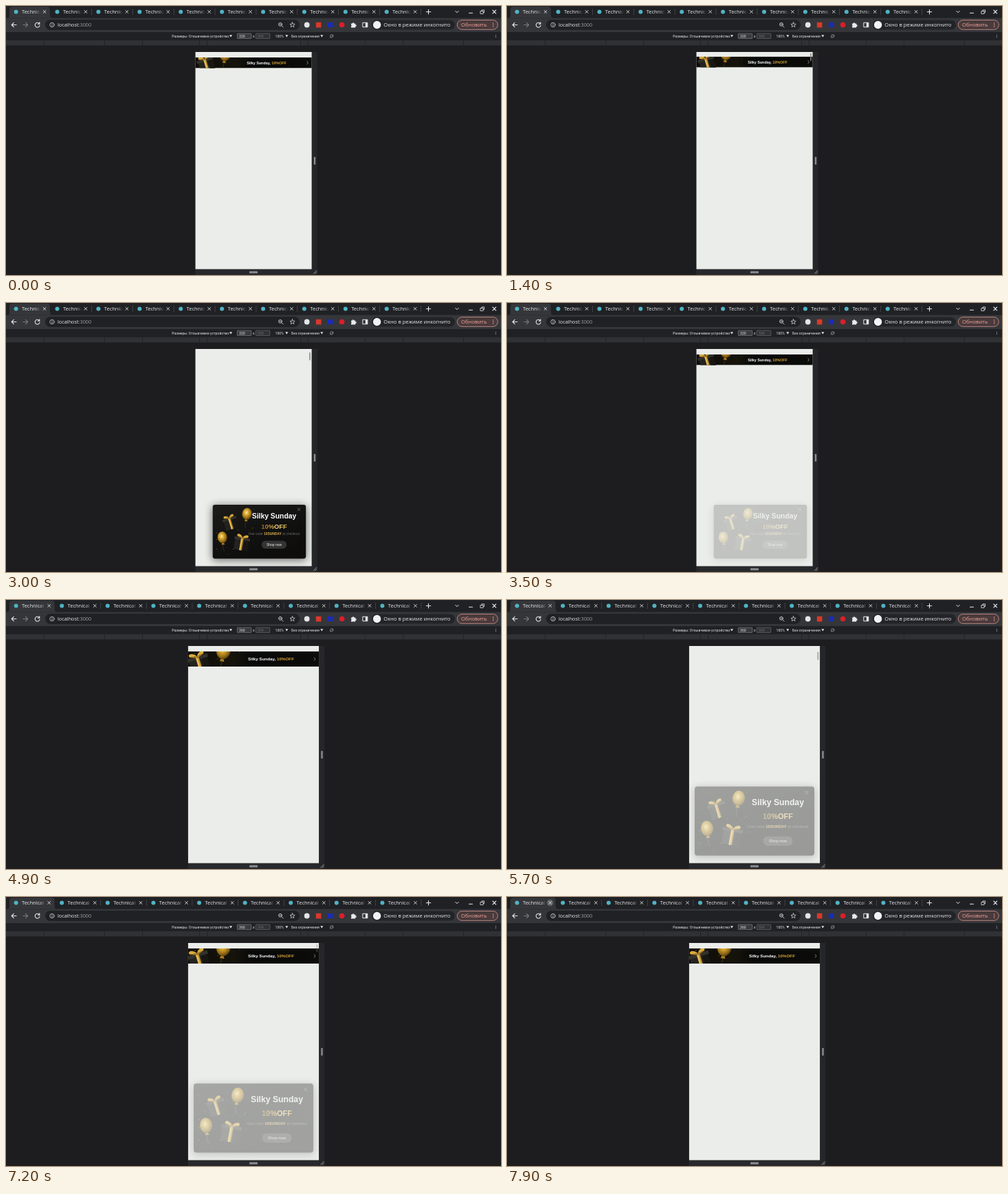
Recreate the animation shown at these times as an HTML page. Size 720 px wide and 392 px high, loop 8 s.

```html
<!DOCTYPE html>
<html lang="ru">
<head>
<meta charset="utf-8">
<title>Banner demo</title>
<style>
html, body { margin: 0; width: 100%; height: 100%; overflow: hidden; background: #1d1d1f; }
svg { display: block; width: 100vw; height: 100vh; }
text { white-space: pre; }
.ui { font-family: "Open Sans", "Noto Sans", sans-serif; fill: #e8eaed; }
.tool { font: 5.15px Roboto, sans-serif; fill: #e3e5e8; }
.shop { font-family: "Liberation Sans", Arial, sans-serif; text-anchor: middle; }
.b { font-weight: 700; }
.line { fill: none; stroke: #e8eaed; stroke-linecap: round; stroke-linejoin: round; }

.narrow, .wide, .scroll, .thumb, .card, .hover { animation: 8s linear infinite; }
.narrow { animation-name: narrow; }
.wide { animation-name: wide; }
.narrow .scroll { animation-name: scroll-a; }
.wide .scroll { animation-name: scroll-b; }
.narrow .thumb { animation-name: thumb-a; }
.wide .thumb { animation-name: thumb-b; }
.narrow .card { animation-name: card-a; }
.wide .card { animation-name: card-b; }
.hover { animation-name: hover; }

@keyframes narrow { 0%, 57.49% { visibility: visible; } 57.5%, 100% { visibility: hidden; } }
@keyframes wide { 0%, 57.49% { visibility: hidden; } 57.5%, 100% { visibility: visible; } }
@keyframes scroll-a {
  0%, 17.3% { transform: translateY(0); }
  17.5% { transform: translateY(-1px); }
  21.5% { transform: translateY(-26px); }
  25%, 34.5% { transform: translateY(-185px); }
  38.75% { transform: translateY(-20px); }
  40%, 100% { transform: translateY(0); }
}
@keyframes scroll-b {
  0%, 67.5% { transform: translateY(0); }
  69% { transform: translateY(-30px); }
  71.2%, 82% { transform: translateY(-185px); }
  85% { transform: translateY(-22px); }
  87%, 100% { transform: translateY(0); }
}
@keyframes thumb-a {
  0%, 17.2% { transform: translateY(0); opacity: 0; }
  17.5%, 20% { transform: translateY(0); opacity: .85; }
  25% { transform: translateY(7px); opacity: .85; }
  27.5%, 33.5% { transform: translateY(7px); opacity: .3; }
  34.5% { transform: translateY(7px); opacity: .85; }
  40% { transform: translateY(0); opacity: .85; }
  44%, 100% { transform: translateY(0); opacity: 0; }
}
@keyframes thumb-b {
  0%, 67.3% { transform: translateY(0); opacity: 0; }
  67.5% { transform: translateY(0); opacity: .7; }
  71.2% { transform: translateY(7px); opacity: .7; }
  76%, 81% { transform: translateY(7px); opacity: .3; }
  82% { transform: translateY(7px); opacity: .7; }
  85%, 88% { transform: translateY(0); opacity: .7; }
  93%, 100% { transform: translateY(0); opacity: 0; }
}
@keyframes card-a {
  0%, 21.6% { opacity: 0; }
  28.1%, 38.75% { opacity: 1; }
  44.9%, 100% { opacity: 0; }
}
@keyframes card-b {
  0%, 69% { opacity: 0; }
  75.25%, 86% { opacity: 1; }
  92%, 100% { opacity: 0; }
}
@keyframes hover { 0%, 96.8% { opacity: 0; } 96.9%, 100% { opacity: 1; } }
</style>
</head>
<body>
<svg id="stage" viewBox="0 0 720 392" preserveAspectRatio="none">
  <defs>
    <linearGradient id="gold">
      <stop offset="0" stop-color="#94641f"/><stop offset=".35" stop-color="#c7953e"/>
      <stop offset=".6" stop-color="#f5d67c"/><stop offset="1" stop-color="#d9ae4f"/>
    </linearGradient>
    <radialGradient id="balloon" cx=".42" cy=".4" r=".65">
      <stop offset="0" stop-color="#ffe9a0"/><stop offset=".35" stop-color="#d7a62e"/>
      <stop offset=".75" stop-color="#8f6715"/><stop offset="1" stop-color="#4a350c"/>
    </radialGradient>
    <linearGradient id="strip">
      <stop offset="0" stop-color="#0d0b06"/><stop offset=".35" stop-color="#15130a"/>
      <stop offset=".5" stop-color="#070808"/><stop offset="1" stop-color="#0c0c09"/>
    </linearGradient>
    <linearGradient id="dark" x2=".6" y2="1">
      <stop offset="0" stop-color="#1d1c1a"/><stop offset=".5" stop-color="#121212"/><stop offset="1" stop-color="#0e0d0c"/>
    </linearGradient>
    <filter id="blur" x="-30%" y="-40%" width="160%" height="180%"><feGaussianBlur stdDeviation="6"/></filter>
  </defs>
</svg>
<script>
const TITLE = 'Silky Sunday', CODE = '10SUNDAY';
const stage = document.getElementById('stage');

const rect = (x, y, w, h, fill, r = 0, more = '') =>
  `<rect x="${x}" y="${y}" width="${w}" height="${h}" rx="${r}" fill="${fill}" ${more}/>`;
const disc = (x, y, r, fill) => `<circle cx="${x}" cy="${y}" r="${r}" fill="${fill}"/>`;
const line = (d, w = 1, more = '') => `<path class="line" d="${d}" stroke-width="${w}" ${more}/>`;
const text = (cls, x, y, s, more = '') => `<text class="${cls}" x="${x}" y="${y}" ${more}>${s}</text>`;
const cross = (x, y, r, w, more = '') =>
  line(`M${x - r} ${y - r}L${x + r} ${y + r}M${x + r} ${y - r}L${x - r} ${y + r}`, w, more);
const down = (x, y) => `<path d="M${x} ${y}h4l-2 3.2z" fill="#e3e5e8"/>`;
const dots = (x, y, gap, r, fill) => [-gap, 0, gap].map(d => disc(x, y + d, r, fill)).join('');

function random(seed) {
  return () => (seed = (seed * 16807) % 2147483647) / 2147483647;
}

function confetti() {
  const rnd = random(77);
  let out = '';
  for (let i = 0; i < 34; i++) {
    const x = 5 + rnd() * 72, y = 5 + rnd() * 90, s = .5 + rnd() * 1.3;
    out += rect(x.toFixed(1), y.toFixed(1), s.toFixed(1), (s * .8).toFixed(1),
      rnd() < .5 ? '#b98c2c' : '#6d5220', .3);
  }
  return out;
}

const balloon = (x, y, tilt) => `<g transform="translate(${x} ${y}) rotate(${tilt})">
  <path d="M-1.5 10L1.5 10L3 14H-3Z" fill="#a67a1f"/>
  <path d="M0 14Q-2 20 1 27" fill="none" stroke="#6d5220" stroke-width=".5"/>
  <ellipse rx="9" ry="11" fill="url(#balloon)"/></g>`;

const gift = (x, y, size, tilt) => `<g transform="translate(${x} ${y}) rotate(${tilt}) scale(${size})">
  <path d="M-12 -6H12V13H-12Z" fill="#24231f"/><path d="M4 -6H12V13H4Z" fill="#171613"/>
  <path d="M-13.5 -9H13.5V-4.5H-13.5Z" fill="#33312b"/>
  <path d="M-2 -9H2V13H-2Z" fill="#c4942f"/><path d="M-2 -9H0V13H-2Z" fill="#e6bf5c"/>
  <path d="M0 -9C-4 -16 -12 -15 -9 -10ZM0 -9C4 -16 12 -15 9 -10Z" fill="#d9aa3e"/>
  <path d="M-9 -10L0 -9L9 -10L0 -6.5Z" fill="#a57820"/></g>`;

const art = confetti() + balloon(64, 17, 8) + gift(33, 33, 1, -17) +
  balloon(18, 61, -6) + gift(54, 71, 1.1, 10);

function tabs(n, w) {
  const id = 'fade' + n;
  let out = `<defs><linearGradient id="${id}" gradientUnits="userSpaceOnUse" x1="${w - 18}" y1="0" x2="${w - 9}" y2="0">
    <stop offset="0" stop-color="#e8eaed"/><stop offset="1" stop-color="#e8eaed" stop-opacity="0"/></linearGradient></defs>
    <path d="M1 17.5Q5 17.5 5 13V5Q5 1 9 1H${w}Q${w + 4} 1 ${w + 4} 5V13Q${w + 4} 17.5 ${w + 8} 17.5Z" fill="#35363a"/>`;
  for (let i = 0; i < n; i++) {
    out += `<g transform="translate(${i * w} 0)">` + disc(14.6, 8.4, 3, '#4fb3c4') +
      text('ui', 23, 11, 'Technical', `font-size="7.5" style="fill:url(#${id})"`);
    if (!i && n === 9) out += `<g class="hover">${disc(w - 3.9, 8.4, 4.6, '#5f6368')}</g>`;
    out += cross(w - 3.9, 8.4, 1.9, .9);
    if (i) out += rect(w + 4.2, 4, .6, 9, '#55585d');
    out += '</g>';
  }
  return out;
}

function banner(c) {
  const { x, w, h } = c;
  return `<g class="scroll"><svg x="${x}" y="75" width="${w}" height="${h}">
    ${rect(0, 0, w, h, 'url(#strip)')}
    <g transform="translate(${c.art})">${art}</g>
    ${rect(w * .39, 1, 1, .6, '#8a6a2a')}${rect(w * .64, 1.4, 1, .6, '#6d5220')}${rect(w * .8, h - 3, 1, .6, '#5a461d')}
    </svg>
    <text class="shop b" x="${c.bx}" y="${c.by}" font-size="${c.bs}" fill="#fff">${TITLE}, <tspan fill="#d6a437">10%OFF</tspan></text>
    ${line(`M${x + w - 7} ${75 + h / 2 - 2.2}l1.6 2.2l-1.6 2.2`, .7, 'style="stroke:#aaa"')}</g>`;
}

function card(c) {
  const [x, y, w, h] = c.box, k = w / 174;
  return `<g class="card">
    ${rect(x - 1, y + 1, w + 2, h + 2, '#000', 5, 'opacity=".5" filter="url(#blur)"')}
    ${rect(x, y, w, h, 'url(#dark)', 4 * k)}
    <g transform="translate(${x} ${y}) scale(${k})">${art}</g>
    ${cross(c.cx, y + 8.6 * k, 2.5 * k, .6, 'style="stroke:#999"')}
    ${text('shop b', c.mid, c.y1, TITLE, `font-size="${12.2 * c.f}" fill="#fff"`)}
    ${text('shop b', c.mid, c.y2, '10%OFF', `font-size="${11 * c.f}" fill="url(#gold)"`)}
    <text class="shop" x="${c.mid}" y="${c.y3}" font-size="${5.8 * c.f}" fill="#6a6a6a">Use code <tspan class="b" fill="#dcb052">${CODE}</tspan> at checkout</text>
    ${rect(c.mid - 21.5 * c.f, c.y4, 43 * c.f, 13.3 * c.f, '#343434', 6.6 * c.f)}
    ${text('shop', c.mid, c.y4 + 8.6 * c.f, 'Shop now', `font-size="${5.85 * c.f}" fill="#f2f2f2"`)}
  </g>`;
}

function scene(c) {
  const { x, w } = c, r = x + w, id = 'view' + w;
  return `<g class="${c.name}">${tabs(c.tabs, c.step)}
    ${text('tool', 339, 45.8, c.label)}
    ${rect(x, 384, w + 8, 8, '#28292c')}${rect(r, 67, 8, 325, '#252629')}
    ${rect(354, 386.6, 12, 3, '#8b8d91', .5)}${rect(r + 3, 220, 2.4, 11, '#8b8d91', .5)}
    ${line(`M${r + 2.5} 390l4.5-4.5M${r + 5} 390l2-2`, .8, 'style="stroke:#b5b7ba"')}
    <clipPath id="${id}">${rect(x, 67, w, 316.5, '#000')}</clipPath>
    <g clip-path="url(#${id})">${rect(x, 67, w, 317, '#ebedea')}
      ${banner(c)}${card(c)}
      <g class="thumb">${rect(r - 3.8, 68.7, 1.8, 11.6, '#85878a', .9)}</g>
    </g></g>`;
}

function chrome() {
  let ruler = rect(0, 50, 720, 7.5, '#303134');
  for (const d of [55, 143, 198, 281, 292, 428, 439, 522, 577, 665]) ruler += rect(d, 50, .7, 7.5, '#1f2023');
  return rect(0, 0, 720, 392, '#1d1d1f') + rect(0, 0, 720, 18, '#202124') +
    rect(0, 17.5, 720, 20.5, '#35363a') + rect(0, 38, 720, 12, '#202124') + ruler +
    // window controls
    line('M614.5 5.3v6.4M611.3 8.5h6.4', 1.1) + line('M653.8 7.4l2.2 2.2l2.2-2.2', 1) +
    line('M673.5 10.3h5', 1.1) + line('M690.3 7.5h3.8v3.8h-3.8zM692 7.3v-1.5h3.6v3.6h-1.3', .8) +
    cross(710.3, 8.4, 2.4, 1.1) +
    // navigation
    line('M15 27.5H8.3M11.3 24.4L8.2 27.5L11.3 30.6', 1.1) +
    line('M24.8 27.5H31.5M28.5 24.4L31.6 27.5L28.5 30.6', 1.1, 'opacity=".38"') +
    line('M48.4 25.6A3.4 3.4 0 1 0 49 28.4M48.8 23.8V26.2H46.4', 1.1) +
    // address bar
    rect(57, 20, 370, 15, '#202124', 7.5) +
    `<circle class="line" cx="67" cy="27.5" r="3.2" stroke-width=".7"/>` + line('M67 27.2v1.9M67 25.7v.1', .8) +
    `<text class="ui" x="75" y="30" font-size="7.3">localhost<tspan fill="#9aa0a6">:3000</tspan></text>` +
    `<circle class="line" cx="399" cy="26.8" r="2.4" stroke-width=".8"/>` + line('M401 28.8l2.2 2.2M398 26.8h2', .8) +
    line('M416.6 23.8l1 2.4 2.6.2-2 1.7.6 2.5-2.2-1.4-2.2 1.4.6-2.5-2-1.7 2.6-.2z', .7) +
    // toolbar buttons
    disc(437.7, 27.5, 3.9, '#e4e6e9') + rect(450.8, 23.8, 7.6, 7.6, '#d8392b') +
    rect(468, 24, 7.4, 7, '#1a2cb8') + disc(488.6, 27.5, 3.8, '#d9202a') +
    `<path d="M502 25.4h1.8a1.2 1.2 0 1 1 2.4 0h2v2a1.2 1.2 0 1 1 0 2.3v1.8h-6.2v-2a1.2 1.2 0 0 0 0-2z" fill="#e8eaed"/>` +
    line('M519.2 24.3h6.6v6.4h-6.6z', 1) + rect(522.8, 24.3, 3, 6.4, '#e8eaed') +
    rect(532, 20.4, 121, 14.2, '#232427', 7.1) + disc(539.6, 27.5, 5.7, '#f1f3f4') +
    text('ui', 549.3, 30.1, 'Окно в режиме инкогнито', 'font-size="7.55"') +
    rect(656.3, 20.5, 59, 13.8, '#493a3b', 6.9, 'stroke="#d99a94" stroke-width=".8"') +
    text('ui', 662, 30.1, 'Обновить', 'font-size="7.7" style="fill:#f0a39b"') +
    dots(708.6, 27.5, 2.5, .75, '#f0a39b') +
    // device bar
    text('tool', 241.3, 45.8, 'Размеры: Отзывчивое устройство') + down(325, 42.3) +
    rect(336.3, 40.2, 20.5, 7.2, '#3a3b3e', .6, 'stroke="#8c8e92" stroke-width=".6"') +
    text('tool', 359, 45.8, 'x') +
    rect(363.3, 40.2, 20.5, 7.2, '#303134', .6, 'stroke="#77797d" stroke-width=".6"') +
    text('tool', 366, 45.8, '599', 'style="fill:#6c6e72"') +
    text('tool', 391.6, 45.8, '100%', 'font-size="5.4"') + down(406.3, 42.3) +
    text('tool', 415, 45.8, 'Без ограничения') + down(457.3, 42.3) +
    `<circle class="line" cx="473.6" cy="43.9" r="2.2" stroke-width=".7" opacity=".6"/>` +
    line('M471.4 46.1l4.4-4.4', .6, 'opacity=".6"') + dots(712.4, 43.9, 1.7, .5, '#bdc1c6');
}

const narrow = {
  name: 'narrow', tabs: 10, step: 59.9, label: '320', x: 275.3, w: 169.5, h: 15.6,
  art: '-14 -20) scale(.9', bx: 379, by: 84.8, bs: 5.4,
  box: [300.7, 294, 135.5, 78.4], cx: 426, mid: 390, f: .85, y1: 313.7, y2: 328.6, y3: 338.2, y4: 346.6
};
const wide = {
  name: 'wide', tabs: 9, step: 66.6, label: '360', x: 264.7, w: 190.6, h: 22,
  art: '-22 -21) scale(1.15', bx: 385.5, by: 88.1, bs: 6.25,
  box: [273, 271.8, 174, 100.6], cx: 435.6, mid: 394, f: 1, y1: 299.4, y2: 319.2, y3: 332.2, y4: 344.6
};
stage.insertAdjacentHTML('beforeend', chrome() + scene(narrow) + scene(wide));
</script>
</body>
</html>
```
